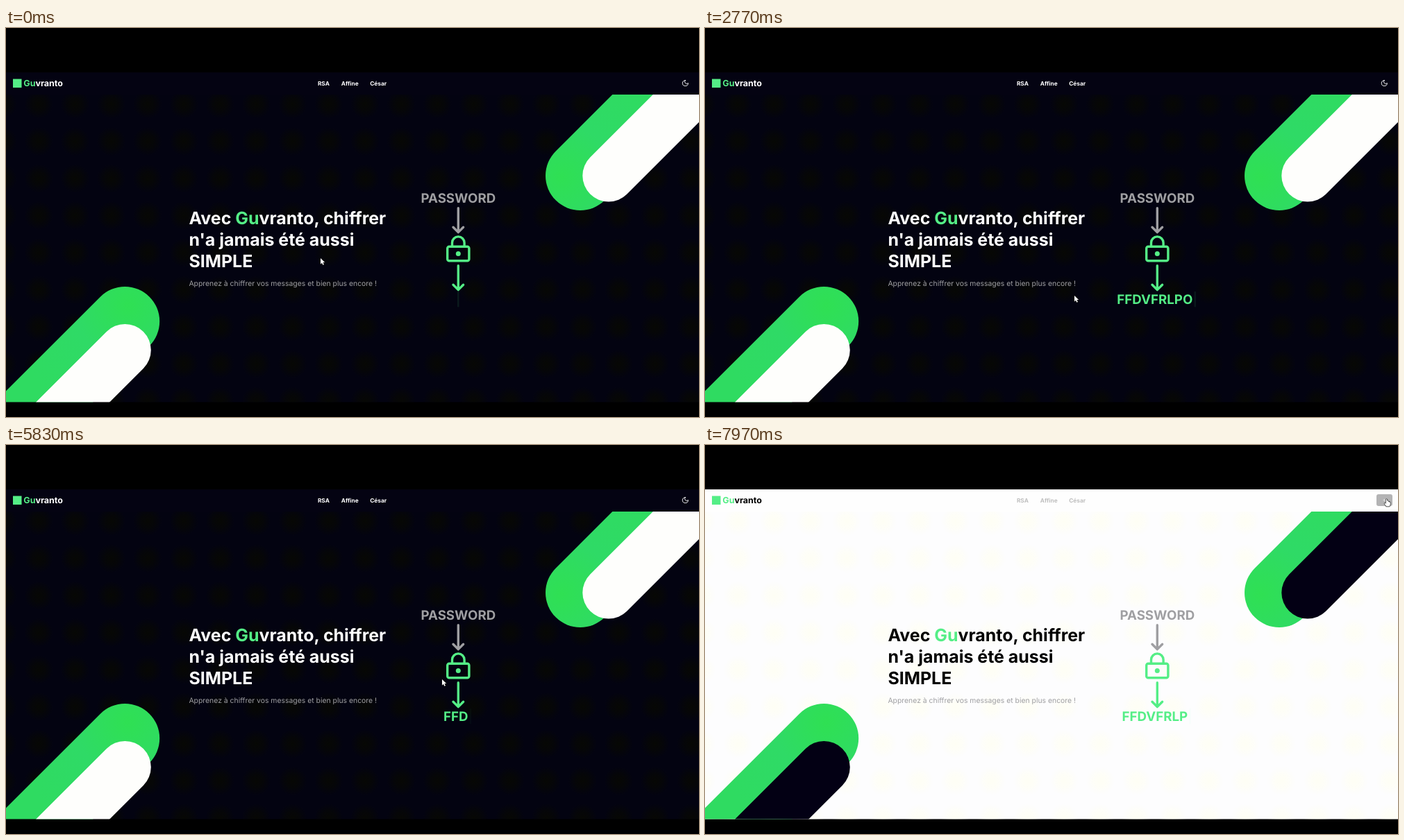
An HTML page with a canvas for the animation above (8000 ms loop, 998 by 561 pixels).

```html
<!DOCTYPE html>
<html lang="fr">
<head>
<meta charset="utf-8">
<title>Guvranto</title>
<style>
  html, body { margin: 0; width: 100%; height: 100%; overflow: hidden; background: #000; }
  canvas { display: block; width: 998px; height: 561px; }
</style>
</head>
<body>
<canvas id="stage" width="998" height="561"></canvas>
<script>
const ctx = document.getElementById("stage").getContext("2d");
const LOOP = 8000, TOP = 64, BODY = 96, BOTTOM = 539.5;
const SWITCH = 7925;
const GREEN = "#54ee86", GRAY = "#9f9fa2";
const BRAND = ["Gu", "vranto"], CIPHER = "FFDVFRLPO";

const dark = { bg: "#030311", header: "#040312", spot: "8,9,0", spotAlpha: 0.75, text: "#fff", pill: "#fefefc", button: "#1f1f22" };
const light = { bg: "#fdfdfe", header: "#fefefe", spot: "255,255,238", spotAlpha: 0.6, text: "#000", pill: "#030014", button: "#b3b3b4" };

// time, x, y of the pointer
const path = [
  [0, 453, 332], [400, 451, 332], [1330, 445, 329], [1900, 462, 342], [2770, 532, 386],
  [3600, 536, 342], [4570, 505, 281], [5100, 545, 297], [5830, 628, 338],
  [6500, 660, 322], [7400, 981.5, 78], [8000, 981.5, 78]
];

// areas where the pointer becomes a text beam
const textAreas = [[264, 262, 547, 290], [264, 293, 501, 321], [264, 325, 355, 352], [264, 362, 534, 376]];
const button = [967, 71, 990, 88];

const clamp = v => Math.max(0, Math.min(1, v));
const smooth = u => u * u * (3 - 2 * u);
const inside = ([x, y], [l, t, r, b]) => x >= l && x <= r && y >= t && y <= b;

function pointerAt(t) {
  let i = 0;
  while (i < path.length - 2 && t >= path[i + 1][0]) i++;
  const [a, b] = [path[i], path[i + 1]];
  const u = smooth(clamp((t - a[0]) / (b[0] - a[0])));
  return [a[1] + (b[1] - a[1]) * u, a[2] + (b[2] - a[2]) * u];
}

// CSS "ease" curve
function ease(x) {
  let lo = 0, hi = 1, s = 0.5;
  for (let i = 0; i < 16; i++) {
    s = (lo + hi) / 2;
    const at = 3 * s * (1 - s) ** 2 * 0.25 + 3 * s * s * (1 - s) * 0.25 + s ** 3;
    if (at < x) lo = s; else hi = s;
  }
  return 3 * s * (1 - s) ** 2 * 0.1 + 3 * s * s * (1 - s) + s ** 3;
}

function caretAlpha(t) {
  const p = ((t + 50) % 1000) / 500;
  return p < 1 ? ease(p) : 1 - ease(p - 1);
}

function typedCount(t) {
  const steps = (start, step) => t < start ? 0 : Math.min(9, 1 + Math.floor((t - start) / step));
  if (t < 5510) return steps(110, 128);
  if (t < 7000) return 9 - steps(5510, 60);
  return steps(7110, 120);
}

function label(str, x, y, size, weight, color) {
  ctx.font = `${weight} ${size}px Inter, sans-serif`;
  ctx.fillStyle = color;
  ctx.fillText(str, x, y);
  return x + ctx.measureText(str).width;
}

function stroke(color, width, draw) {
  ctx.strokeStyle = color;
  ctx.lineWidth = width;
  ctx.lineCap = ctx.lineJoin = "round";
  ctx.beginPath();
  draw();
  ctx.stroke();
}

function disc(x, y, r, color) {
  ctx.fillStyle = color;
  ctx.beginPath();
  ctx.arc(x, y, r, 0, Math.PI * 2);
  ctx.fill();
}

// diagonal bar with a round end; dir is -1 towards bottom left, 1 towards top right
function pill(x, y, r, dir, color) {
  stroke(color, r * 2, () => {
    ctx.moveTo(x, y);
    ctx.lineTo(x + dir * 400, y - dir * 400);
  });
}

function greenFill(x, y) {
  const g = ctx.createRadialGradient(x, y, 0, x, y, 170);
  g.addColorStop(0, "#2fe053");
  g.addColorStop(0.45, "#2fda66");
  g.addColorStop(1, "#2fdb61");
  return g;
}

function background(theme) {
  ctx.fillStyle = "#000";
  ctx.fillRect(0, 0, 998, 561);
  ctx.fillStyle = theme.bg;
  ctx.fillRect(0, TOP, 998, BOTTOM - TOP);
  ctx.save();
  ctx.beginPath();
  ctx.rect(0, BODY, 998, BOTTOM - BODY);
  ctx.clip();
  for (let y = 110; y < 560; y += 53.5) {
    for (let x = -5; x < 1020; x += 52.2) {
      const g = ctx.createRadialGradient(x, y, 0, x, y, 21);
      g.addColorStop(0, `rgba(${theme.spot},${theme.spotAlpha})`);
      g.addColorStop(0.45, `rgba(${theme.spot},${theme.spotAlpha * 0.7})`);
      g.addColorStop(1, `rgba(${theme.spot},0)`);
      ctx.fillStyle = g;
      ctx.fillRect(x - 21, y - 21, 42, 42);
    }
  }
  pill(171.2, 423, 50, -1, greenFill(175, 400));
  pill(171.3, 464.5, 37.5, -1, theme.pill);
  pill(827, 213, 50, 1, greenFill(800, 215));
  pill(867.8, 213, 37.5, 1, theme.pill);
  ctx.restore();
}

function header(theme, t, hover) {
  ctx.fillStyle = theme.header;
  ctx.fillRect(0, TOP, 998, BODY - TOP);
  ctx.fillStyle = GREEN;
  ctx.fillRect(10, 73.5, 12.5, 12.5);
  const x = label(BRAND[0], 25.3, 83.6, 12.48, 700, GREEN);
  label(BRAND[1], x, 83.6, 12.48, 700, theme.text);

  const shade = Math.round(255 * (1 - smooth(clamp((t - SWITCH) / 140))));
  const ink = `rgb(${shade},${shade},${shade})`;
  label("RSA", 448.9, 82.6, 8.32, 700, ink);
  label("Affine", 482.8, 82.6, 8.32, 700, ink);
  label("César", 524.2, 82.6, 8.32, 700, ink);

  if (hover) {
    ctx.fillStyle = theme.button;
    ctx.beginPath();
    ctx.roundRect(967, 71, 23, 17, 3);
    ctx.fill();
  }
  if (theme === light) {
    disc(978.3, 79.5, 1.8, "#cfcfcf");
    return;
  }
  ctx.save();
  ctx.translate(972.9, 74.1);
  ctx.scale(0.45, 0.45);
  ctx.strokeStyle = "#fff";
  ctx.lineWidth = 2.1;
  ctx.lineJoin = "round";
  ctx.stroke(moon);
  ctx.restore();
}
const moon = new Path2D("M12 3a6 6 0 0 0 9 9 9 9 0 1 1-9-9Z");

function heading(theme) {
  const left = 263.4, size = 24.95;
  let x = label("Avec ", left, 282.6, size, 700, theme.text);
  x = label(BRAND[0], x, 282.6, size, 700, GREEN);
  label(BRAND[1] + ", chiffrer", x, 282.6, size, 700, theme.text);
  label("n'a jamais été aussi", left, 313.8, size, 700, theme.text);
  label("SIMPLE", left, 345, size, 700, theme.text);
  label("Apprenez à chiffrer vos messages et bien plus encore !", left, 371.9, 10.4, 400, GRAY);
}

function arrow(y, color) {
  const x = 651.3;
  stroke(color, 3.4, () => {
    ctx.moveTo(x, y);
    ctx.lineTo(x, y + 34.5);
    ctx.moveTo(x - 7.3, y + 27.5);
    ctx.lineTo(x, y + 34.8);
    ctx.lineTo(x + 7.3, y + 27.5);
  });
}

function diagram(t) {
  const mid = 651.3, size = 18.71;
  ctx.textAlign = "center";
  label("PASSWORD", mid, 252.3, size, 700, GRAY);
  ctx.textAlign = "left";
  arrow(259.8, GRAY);
  stroke(GREEN, 3.4, () => {
    ctx.roundRect(635.7, 315.2, 31.2, 20.6, 2.6);
    ctx.moveTo(mid - 8.8, 315);
    ctx.lineTo(mid - 8.8, 309.7);
    ctx.arc(mid, 309.7, 8.8, Math.PI, 0);
    ctx.lineTo(mid + 8.8, 315);
  });
  disc(mid, 325.4, 3.5, GREEN);
  arrow(342.8, GREEN);

  const typed = CIPHER.slice(0, typedCount(t));
  ctx.font = `700 ${size}px Inter, sans-serif`;
  const width = ctx.measureText(typed).width + ctx.measureText("|").width;
  const end = label(typed, mid - width / 2, 398, size, 700, GREEN);
  ctx.globalAlpha = caretAlpha(t);
  label("|", end, 398, size, 700, GREEN);
  ctx.globalAlpha = 1;
}

const arrowShape = new Path2D("M0 0V8.4L2 6.7L3.4 9.7L4.9 9L3.5 6.1H6.1Z");
const handShape = new Path2D("M-.9 .6Q0-.6 .9 .6V3.6Q2-.1 2.6 3.9Q3.7 3 4.1 4.4Q5.2 3.8 5.3 5.2V7.6Q5.1 9 4.3 10.6H-.3Q-1.4 8.8-3 6.9Q-3.3 5.3-2 5.7L-.9 6.7Z");
const beamShape = new Path2D("M-2-4Q0-4 0-3Q0-4 2-4M0-3V3M-2 4Q0 4 0 3Q0 4 2 4");

function pointer(pos, hover) {
  const beam = textAreas.some(area => inside(pos, area));
  ctx.save();
  ctx.translate(pos[0], pos[1]);
  ctx.lineJoin = "round";
  if (beam) {
    ctx.strokeStyle = "#858585";
    ctx.lineWidth = 0.9;
    ctx.stroke(beamShape);
  } else {
    const shape = hover ? handShape : arrowShape;
    ctx.strokeStyle = "#111";
    ctx.lineWidth = 1.2;
    ctx.stroke(shape);
    ctx.fillStyle = "#fff";
    ctx.fill(shape);
  }
  ctx.restore();
}

function draw(now) {
  let t = now % LOOP;
  if (t > 5830 && t < 5970) t = 5830; // brief stall
  const theme = t < SWITCH ? dark : light;
  const pos = pointerAt(t);
  const hover = inside(pos, button);
  ctx.textRendering = "geometricPrecision";
  background(theme);
  header(theme, t, hover);
  heading(theme);
  diagram(t);
  pointer(pos, hover);
}

const begin = performance.now();
function tick() {
  draw(performance.now() - begin);
  requestAnimationFrame(tick);
}
tick();
</script>
</body>
</html>
```
